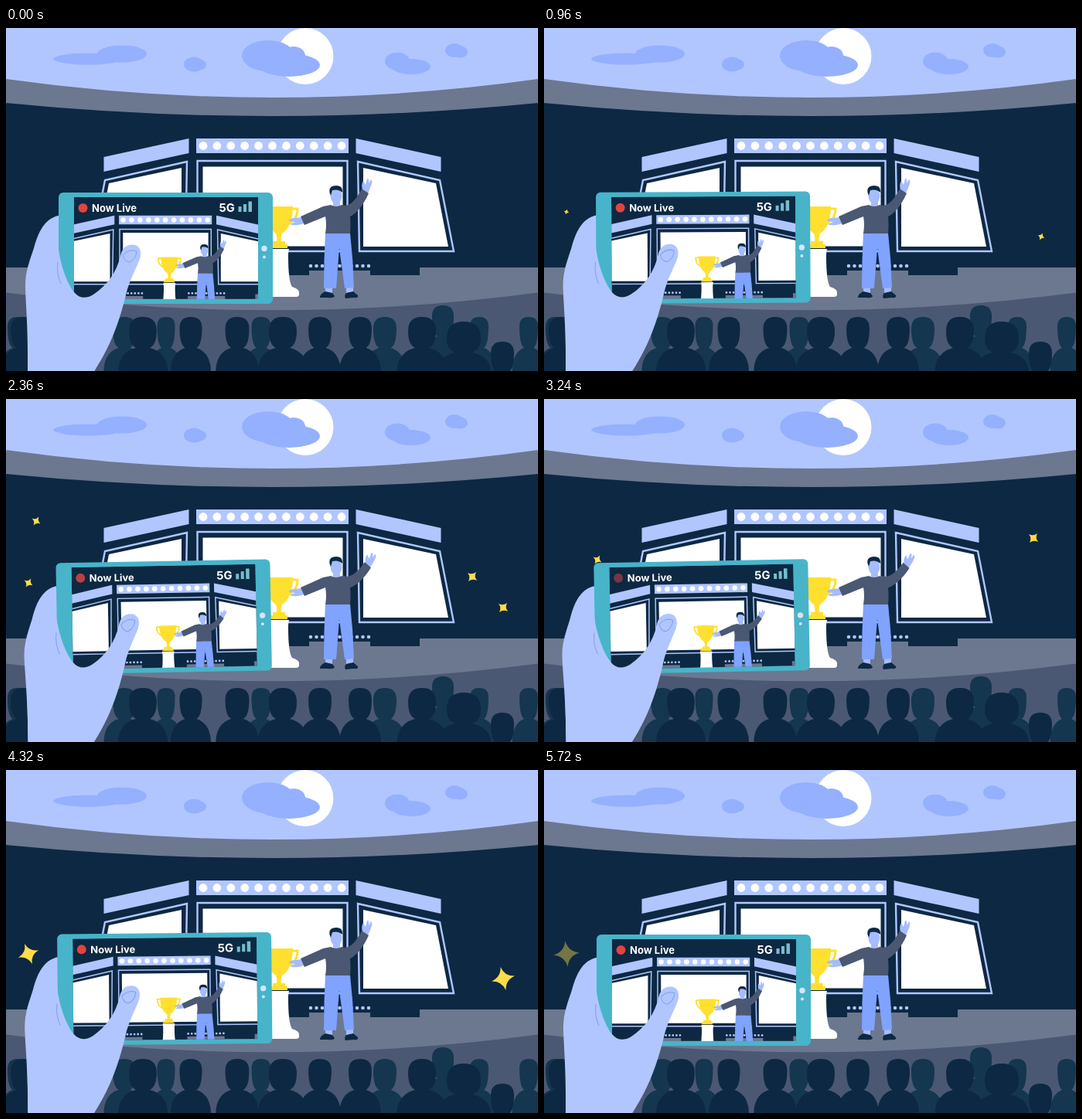
Write an HTML page that moves like this. It is 688x444 px and loops after 5760 ms.

```html
<!DOCTYPE html>
<html lang="en">
<head>
<meta charset="utf-8">
<title>Live show</title>
<style>
  html, body { margin: 0; width: 100%; height: 100%; overflow: hidden; background: #0d2842; }
  svg { display: block; width: 688px; height: 444px; }
  text { font-family: Inter, "Open Sans", sans-serif; font-weight: 700; fill: #fff; }
</style>
</head>
<body>
<svg viewBox="0 0 688 444">
  <defs><clipPath id="screen"><rect x="88" y="219" width="238" height="132"/></clipPath></defs>

  <rect width="688" height="444" fill="#0d2842"/>
  <path fill="#b1c6ff" d="M0 0H688V68Q344 116 0 68Z"/>
  <circle cx="387" cy="36.500" r="36.500" fill="#fff"/>
  <g fill="#95b0ff">
    <ellipse cx="106" cy="40" rx="45" ry="7.500"/><ellipse cx="150" cy="33.500" rx="32" ry="11"/>
    <ellipse cx="243" cy="47" rx="13" ry="9.500"/><ellipse cx="250" cy="47.500" rx="9" ry="7"/>
    <ellipse cx="339" cy="36" rx="34" ry="20"/><ellipse cx="372" cy="36" rx="15" ry="12"/><ellipse cx="366" cy="48" rx="40" ry="15"/>
    <ellipse cx="506" cy="43" rx="16" ry="11.500"/><ellipse cx="524" cy="50" rx="25" ry="10"/>
    <ellipse cx="580" cy="29" rx="12" ry="9"/><ellipse cx="588" cy="31" rx="9" ry="7.500"/>
  </g>
  <path fill="#6b788f" d="M0 66Q344 114 688 66V97Q344 131 0 97Z"/>

  <g id="stage">
    <path fill="#6b788f" d="M0 310H153V320H535V310H688V370H0Z"/>
    <g id="wing">
      <path fill="#6b788f" d="M392 314H471V321H392Z"/>
      <path fill="none" stroke="#b1c6ff" stroke-width="4.600" stroke-linecap="round" stroke-dasharray="0 7.500" d="M394 308H470"/>
      <path fill="#b1c6ff" d="M452.500 143L562.500 167V186L452.500 162Z"/>
      <path fill="#0d2842" stroke="#b1c6ff" stroke-width="2.400" d="M455 173L561 197L579 289H457Z"/>
      <path fill="#fff" d="M462 181L556 201L572 283H462Z"/>
    </g>
    <use href="#wing" transform="matrix(-1 0 0 1 689 0)"/>
    <path fill="#b1c6ff" d="M246 143H443V162H246Z"/>
    <path stroke="#fff" stroke-width="10.800" stroke-linecap="round" stroke-dasharray="0 17.900" d="M255 152.500H435"/>
    <path fill="#fff" stroke="#0d2842" stroke-width="9" d="M250 175H440V287H250Z"/>
    <path fill="none" stroke="#b1c6ff" stroke-width="2.400" d="M247.500 172H441.500V289H247.500Z"/>

    <path fill="#fff" d="M340 286H366Q365 289 365 295Q365 328 370 335Q379 338 379 342V345Q379 348 375 348H331Q327 348 327 345V342Q327 338 336 335Q341 328 341 295Q341 289 340 286Z"/>
    <g fill="#ffe02f">
      <path d="M335 231H371Q371 257 357 266Q355 271 356 276H361V280H364V285H341V280H345V276H350Q351 271 349 266Q335 257 335 231Z"/>
      <path fill="none" stroke="#ffe02f" stroke-width="3" d="M336 234H329Q329 249 343 254M370 234H377Q377 249 363 254"/>
    </g>

    <g fill="#a5bcff">
      <path d="M413 334H422V344H413ZM440 334H449V344H440Z"/>
      <path d="M384 245L373 246Q365 247 366 250L374 251L367 254Q373 257 386 253Z"/>
      <path d="M423 220H432V232H423Z"/>
      <ellipse cx="427" cy="217.500" rx="7.500" ry="10"/>
    </g>
    <path fill="#0d2842" d="M418.500 213Q417 204 427 204Q436 204 435 213Q430 208 422 210L420 217ZM413 341L422 343L425 347Q424 350 416 349H406Q406 344 413 341ZM440 343L449 341L455 346Q456 350 450 349L439 350Q437 346 440 343Z"/>
    <path fill="#7fa3ff" d="M413 265H445Q449 300 450 336L438 337L431 285L427 337H411Q411 300 413 265Z"/>
    <g id="arm">
      <path fill="#a5bcff" d="M461 210Q459 202 462 198L465 203L467 195Q470 194 469 201L472 196Q475 198 471 207L468 214Z"/>
      <path fill="#4b5873" d="M434 229Q447 234 460 208L469 214Q458 239 440 247Z"/>
    </g>
    <path fill="#4b5873" d="M420 229Q427 233 434 229L442 233Q447 245 445 266H413Q415 254 413 244L386 255L381 244L410 231Z"/>
  </g>

  <path fill="#4a5873" d="M0 342.500Q344 388 688 342.500V444H0Z"/>
  <g id="crowd"></g>
  <g id="stars" fill="#ffdc4a"></g>

  <g id="hand">
    <path fill="#b1c6ff" d="M74 242C52 243 42 262 36 285C31 300 25 315 25 333C25 350 29 390 28 446H90V242Z"/>
    <rect x="68" y="213" width="277" height="144" rx="6" fill="#47b4ca"/>
    <g clip-path="url(#screen)">
      <rect x="88" y="219" width="238" height="132" fill="#0d2842"/>
      <use href="#stage" transform="translate(-4 155.500) scale(.61)"/>
    </g>
    <circle id="rec" cx="99.500" cy="233" r="6" fill="#e2443f"/>
    <text x="111" y="238" font-size="13">Now Live</text>
    <text x="275.500" y="238" font-size="14.800">5G</text>
    <path fill="#76bdcd" d="M300.500 231H304.500V238H300.500ZM307 228H311V238H307ZM313.500 224.500H318V238H313.500Z"/>
    <g fill="#d5e6ff"><circle cx="334" cy="285.500" r="3.700"/><circle cx="334" cy="296.500" r="2"/></g>
    <path fill="#b1c6ff" d="M28 446V360L60 280L67 280C70 305 78 329 88 342C95 350 103 351 113 345C131 333 143 316 148 295C150 285 156 280 164 280.500C173 281 176 289 173 299C169 310 162 322 157 338C149 371 139 407 113 446Z"/>
    <path fill="none" stroke="#7f9ff0" d="M67 303Q65 318 71 331M151 294Q153 303 160 303Q168 299 169 289Q160 285 151 294"/>
  </g>
</svg>
<script>
const LOOP = 5760, STAR_LIFE = 480, BEAT = 440;
const $ = id => document.getElementById(id);

function add(parent, tag, attrs) {
  const el = document.createElementNS('http://www.w3.org/2000/svg', tag);
  for (const k in attrs) el.setAttribute(k, attrs[k]);
  return parent.appendChild(el);
}

// One row of spectators seen from behind; head widths vary gently along the row
function row(fill, xs, top, size, spread) {
  const g = add($('crowd'), 'g', { fill });
  xs.forEach((x, i) => {
    const r = size + 2 * Math.sin(i * 2), neck = r * .5, w = r * spread;
    add(g, 'path', { d: `M${x - r} ${top + r}Q${x - r} ${top} ${x} ${top}T${x + r} ${top + r}
      Q${x + r} ${top + 36} ${x + neck} ${top + 40}Q${x + w} ${top + 46} ${x + w} 446
      H${x - w}Q${x - w} ${top + 46} ${x - neck} ${top + 40}Q${x - r} ${top + 36} ${x - r} ${top + r}Z` });
  });
}
row('#14364e', [15, 153, 207, 330, 490, 612, 676], 374, 13, 1.8);
row('#14364e', [565], 359, 14, 1.8);
row('#0d2842', [22, 177, 239, 299, 358, 406, 458, 538], 374, 16, 1.8);
row('#0d2842', [592], 380, 22, 1.6);
row('#0d2842', [642], 406, 15, 1.4);

// Sparkles: each beat lights the pair or pairs named in the order
const order = 'A B C A AB B C A B C A B'.split(' ');
const stars = [
  ['A', 39, 158], ['A', 603, 230],
  ['B', 29, 238], ['B', 643, 270],
  ['C', 69, 208], ['C', 633, 180]
].map(([pair, x, y]) => ({
  x, y,
  starts: order.flatMap((names, i) => names.includes(pair) ? [BEAT * (i + 1) - (x > 344 ? 50 : 10)] : []),
  el: add($('stars'), 'path', { d: 'M0-1Q.16-.16 1 0Q.16.16 0 1Q-.16.16-1 0Q-.16-.16 0-1Z' })
}));

// Smooth 0-1-0 bump around the middle of the loop
function bump(t, width) {
  const u = (t - LOOP / 2) / width;
  return Math.abs(u) < .5 ? (1 + Math.cos(2 * Math.PI * u)) / 2 : 0;
}

function draw(now) {
  const t = now % LOOP;
  $('hand').setAttribute('transform', `rotate(${-1.1 * bump(t, LOOP)} 30 415)`);
  $('arm').setAttribute('transform', `rotate(${11 * bump(t, 2880)} 440 238)`);
  $('rec').setAttribute('opacity', 1 - bump(t, 1440));
  for (const { x, y, starts, el } of stars) {
    const start = starts.find(s => t >= s && t < s + STAR_LIFE);
    const p = start === undefined ? 0 : (t - start) / STAR_LIFE;
    el.setAttribute('transform', `translate(${x} ${y}) rotate(${90 * p - 90}) scale(${18 * p})`);
    el.setAttribute('opacity', p ? Math.min(1, (1 - p) * 7) : 0);
  }
}

const begin = performance.now();
function tick() {
  draw(performance.now() - begin);
  requestAnimationFrame(tick);
}
tick();
</script>
</body>
</html>
```
